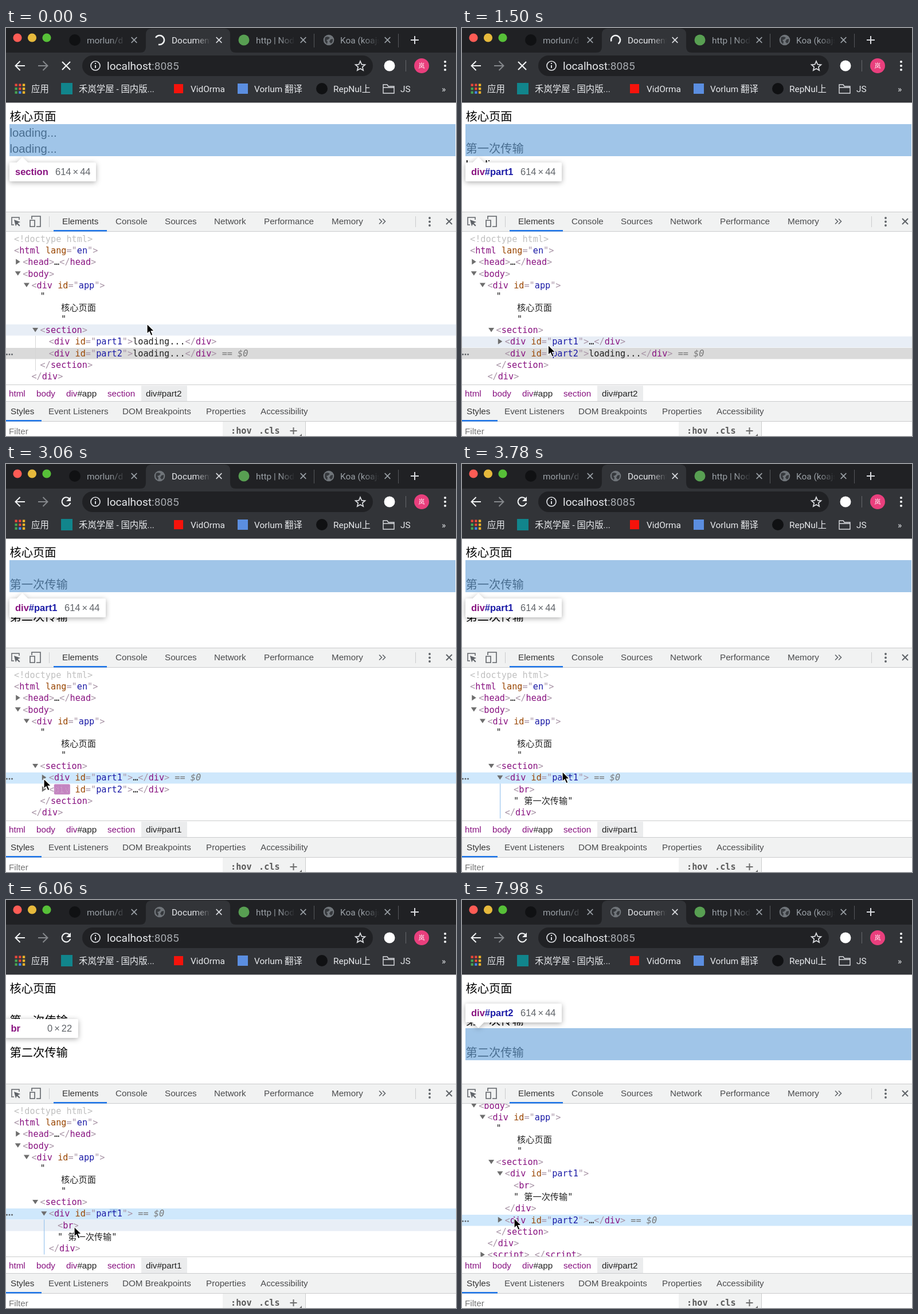
An HTML page that plays this animation: 785x713 px, repeating every 8000 ms.

```html
<!DOCTYPE html>
<html lang="zh-CN">
<head>
<meta charset="utf-8">
<style>
html, body { margin: 0; width: 100%; height: 100%; overflow: hidden; background: #fff; }
svg { display: block; }
text { white-space: pre; }
.ui { font: 15.4px Roboto, "Noto Sans CJK SC", "Noto Sans CJK", sans-serif; fill: #e8eaed; }
.tool { font: 15.2px "Liberation Sans", Roboto, sans-serif; fill: #4a4b4d; }
.page { font: 20.27px "Liberation Sans", "Noto Sans CJK SC", "Noto Sans CJK", sans-serif; }
.code { font: 15.2px "DejaVu Sans Mono", "Noto Sans CJK SC", "Noto Sans CJK", monospace; fill: #222; }
.tip { font: 16.5px "Liberation Sans", sans-serif; }
.tip.name { font-weight: bold; }
</style>
</head>
<body>
<svg width="785" height="713" viewBox="0 0 785 713">
  <defs>
    <clipPath id="treeClip"><rect y="356" width="785" height="267"/></clipPath>
    <clipPath id="pageClip"><rect y="130" width="785" height="191"/></clipPath>
    <linearGradient id="fadeDark"><stop stop-color="#202124" stop-opacity="0"/><stop offset="1" stop-color="#202124"/></linearGradient>
    <linearGradient id="fadeTab"><stop stop-color="#323438" stop-opacity="0"/><stop offset="1" stop-color="#323438"/></linearGradient>
    <filter id="shadow" x="-20%" y="-50%" width="140%" height="220%"><feDropShadow dx="0" dy="2" stdDeviation="5" flood-opacity=".32"/></filter>
    <g id="globe">
      <circle r="9.3" fill="#70757a"/>
      <path d="M-6-5Q-1-7 2-4L-1-1-4 0-2 3-3 7Q-9 2-6-5ZM3-1L7-2Q8 3 4 6L1 3Z" fill="#35383c"/>
    </g>
  </defs>
  <g id="browser"></g>
  <g id="page" clip-path="url(#pageClip)"></g>
  <g id="tools"></g>
  <g id="tree" clip-path="url(#treeClip)"></g>
  <g id="live"></g>
</svg>
<script>
const LOOP = 8000;
const PART1_AT = 540, SELECT1_AT = 2000, PART2_AT = 2900, EXPAND_AT = 3200, SELECT2_AT = 7380;
const PURPLE = '#881280', BLUE = '#1a1aa6', BRACKET = '#a894a6', BROWN = '#994500';
const STRIP = '#202124', TOOLBAR = '#323438';

const layer = id => document.getElementById(id);
const rect = (x, y, w, h, fill, extra = '') => `<rect x="${x}" y="${y}" width="${w}" height="${h}" fill="${fill}" ${extra}/>`;
const circle = (x, y, r, fill) => `<circle cx="${x}" cy="${y}" r="${r}" fill="${fill}"/>`;
const line = (d, stroke, w = 2) => `<path d="${d}" fill="none" stroke="${stroke}" stroke-width="${w}"/>`;
const label = (cls, x, y, s, extra = '') => `<text class="${cls}" x="${x}" y="${y}" ${extra}>${s}</text>`;
const span = (fill, s) => `<tspan fill="${fill}">${s}</tspan>`;
const cross = (x, y, r, color, w = 2) => line(`M${x - r} ${y - r}l${2 * r} ${2 * r}m0 ${-2 * r}l${-2 * r} ${2 * r}`, color, w);
const plus = (x, y, r, color, w = 2) => line(`M${x - r} ${y}h${2 * r}M${x} ${y - r}v${2 * r}`, color, w);
const clamp = v => Math.min(1, Math.max(0, v));
const smooth = v => { v = clamp(v); return v * v * (3 - 2 * v); };

function drawBrowser() {
  const tabs = [[141, 'morlun/d', '#9aa0a6'], [289, 'Document', '#e8eaed'], [436, 'http | Node', '#9aa0a6'], [583, 'Koa (koajs', '#9aa0a6']];
  let s = rect(0, 0, 785, 131, STRIP) + rect(0, 43, 785, 88, TOOLBAR);
  s += `<path d="M234 43Q244 43 244 33V11Q244 1 254 1H381Q391 1 391 11V33Q391 43 401 43Z" fill="${TOOLBAR}"/>`;
  s += ['#fe5c55', '#e6b93c', '#57c038'].map((c, i) => circle(20 + 25.5 * i, 17, 7.6, c)).join('');
  tabs.forEach(([x, title, color], i) => {
    const active = i === 1;
    s += label('ui', x, 27, title, `style="fill:${color}"`);
    s += rect(x + 40, 10, 28, 24, `url(#${active ? 'fadeTab' : 'fadeDark'})`) + rect(x + 68, 10, 22, 24, active ? TOOLBAR : STRIP);
    s += cross(x + 82.5, 21, 4.8, active ? '#dadce0' : '#9aa0a6', 1.7);
  });
  s += circle(120, 21, 10, '#101113') + circle(415, 21, 9.5, '#589f52') + '<use href="#globe" x="563" y="21"/>';
  s += rect(537, 10, 1, 24, '#55575b') + rect(684, 10, 1, 24, '#55575b') + plus(713, 21, 7, '#dadce0');

  s += line('M33 66H17M24.5 58l-8 8 8 8', '#f1f3f4') + line('M56 66H72M64.5 58l8 8-8 8', '#85888c');
  s += rect(133, 48, 507, 36, STRIP, 'rx="18"');
  s += '<circle cx="156" cy="66" r="8" fill="none" stroke="#dadce0" stroke-width="1.7"/>' + line('M156 65v5M156 61v2', '#dadce0');
  s += label('ui', 176, 72.5, 'localhost' + span('#a5a9ae', ':8085'), 'style="font-size:19.1px"');
  s += line('M618 58l2.4 5.6 6 .5-4.6 4 1.4 5.9-5.2-3.1-5.2 3.1 1.4-5.9-4.6-4 6-.5z', '#dadce0', 1.7);
  s += circle(669, 66, 9.5, '#fff') + rect(697, 56, 1, 20, '#65676b');
  s += circle(725, 66, 13, '#e93f7d') + label('ui', 725, 70, '岚', 'text-anchor="middle" style="font-size:11px;fill:#fff"');
  s += [59, 66, 73].map(y => circle(766, y, 2.1, '#f1f3f4')).join('');

  const dots = ['#e8483b', '#e8483b', '#f0b429', '#45a553', '#e8483b', '#f0b429', '#45a553', '#4585ee', '#f0b429'];
  s += dots.map((c, i) => rect(15.5 + i % 3 * 6.7, 97.5 + Math.floor(i / 3) * 6.5, 4.3, 4.3, c)).join('');
  s += rect(96, 96, 20, 20, '#11858c') + rect(293, 98, 16, 16, '#f5130b') + rect(404, 97, 18, 18, '#5b8ee0') + circle(551, 106, 10, '#101113');
  s += '<path d="M658 99h7l2 3h10v12h-19zM658 104h19" fill="none" stroke="#dadce0" stroke-width="1.4"/>';
  const marks = [[44, '应用'], [127, '禾岚学屋 - 国内版...'], [322, 'VidOrma'], [433, 'Vorlum 翻译'], [571, 'RepNul上'], [688, 'JS'], [760, '»']];
  return s + marks.map(([x, name]) => label('ui', x, 111.7, name)).join('');
}

function drawTools() {
  let s = rect(0, 321, 785, 392, '#fff') + rect(0, 321, 785, 35, '#f1f2f2') + rect(0, 321, 785, 1, '#c8c9cb') + rect(0, 355, 785, 1, '#cbcccd');
  s += line('M14 344H10V331H23V335', '#5f6368', 1.5) + '<path d="M14 335l11 4-4.5 2 4 4-1.5 1.5-4-4-2 4z" fill="#5f6368"/>';
  s += line('M45 334V329H60V347H53M42 336h8v11h-8z', '#5f6368', 1.6) + rect(75, 329, 1, 19, '#cbcccd');
  s += rect(83, 353, 93, 2.5, '#1a73e8');
  s += [[98, 'Elements'], [191, 'Console'], [277, 'Sources'], [363, 'Network'], [450, 'Performance'], [568, 'Memory']]
    .map(([x, name]) => label('tool', x, 343.3, name, x === 98 ? 'style="fill:#333"' : '')).join('');
  s += line('M651 333.5l4.5 4.5-4.5 4.5M657 333.5l4.5 4.5-4.5 4.5', '#5f6368', 1.6) + rect(714, 329, 1, 19, '#cbcccd');
  s += [332, 338.5, 345].map(y => circle(739, y, 1.9, '#5f6368')).join('') + cross(773, 338, 5, '#5f6368', 2);

  s += rect(0, 623, 785, 1, '#cbcccd') + rect(236, 625, 80, 27, '#ebeced');
  s += label('tool', 5, 643.5, 'html', `style="fill:${PURPLE}"`) + label('tool', 53, 643.5, 'body', `style="fill:${PURPLE}"`);
  s += label('tool', 105, 643.5, span(PURPLE, 'div') + span('#222', '#app')) + label('tool', 177, 643.5, 'section', `style="fill:${PURPLE}"`);

  s += rect(0, 652, 785, 36, '#f1f2f2') + rect(0, 652, 785, 1, '#cbcccd') + rect(0, 687, 785, 1, '#cbcccd') + rect(0, 685, 62, 2.5, '#1a73e8');
  s += [[8, 'Styles'], [74, 'Event Listeners'], [203, 'DOM Breakpoints'], [349, 'Properties'], [444, 'Accessibility']]
    .map(([x, name]) => label('tool', x, 675.3, name, x === 8 ? 'style="fill:#333"' : '')).join('');
  s += rect(378, 688, 144, 25, '#f1f2f2') + rect(522, 688, 1, 25, '#cbcccd') + label('tool', 5, 709.5, 'Filter', 'style="fill:#757575"');
  s += label('code', 392, 709, ':hov', 'style="font-weight:bold;fill:#5a5a5a"') + label('code', 441, 709, '.cls', 'style="font-weight:bold;fill:#5a5a5a"');
  return s + plus(501.5, 704, 6, '#6e6e6e') + '<path d="M516 709v4h-4z" fill="#6e6e6e"/>';
}

// Pointer stops: time, x, y
const STOPS = [
  [-100, 246, 526], [0, 246, 517], [300, 225, 400], [420, 222, 343], [690, 224, 343], [780, 236, 525],
  [1100, 190, 551], [1900, 111, 557], [2400, 111, 557], [2900, 66, 550], [3220, 66, 550], [3760, 175, 537.5], [4260, 175, 537.5],
  [4900, 150, -40], [4901, 160, 740], [5540, 160, 740], [6020, 119, 571], [6480, 119, 571], [7200, 92, 557], [8000, 91, 556]
];
function pointer(t) {
  const i = Math.max(1, STOPS.findIndex(stop => stop[0] >= t));
  const [t0, x0, y0] = STOPS[i - 1], [t1, x1, y1] = STOPS[i];
  const k = smooth((t - t0) / (t1 - t0));
  return { x: x0 + (x1 - x0) * k, y: y0 + (y1 - y0) * k };
}

const open = (name, key, value) => span(BRACKET, '&lt;') + span(PURPLE, name)
  + (key ? ' ' + span(BROWN, key) + span(BRACKET, '="') + span(BLUE, value) + span(BRACKET, '"') : '') + span(BRACKET, '&gt;');
const close = name => span(BRACKET, '&lt;/') + span(PURPLE, name) + span(BRACKET, '&gt;');

function treeRows(t, scroll) {
  const rows = [];
  let y = 368.5 - scroll;
  const add = (depth, html, more = {}, step = 20.27) => {
    rows.push({ y, x: 14 + 15.2 * depth, html, ...more });
    y += step;
  };
  const part = (id, loadedAt) => {
    const start = open('div', 'id', id), end = close('div');
    const flash = t >= loadedAt ? (1 - clamp((t - loadedAt) / 1400)) ** 4 : 0;
    if (t < loadedAt) return add(4, start + 'loading...' + end, { id });
    if (id === 'part2' || t < EXPAND_AT) return add(4, start + '…' + end, { id, arrow: 'right', flash });
    add(4, start, { id, arrow: 'down' });
    add(5, open('br'), { id: 'br' });
    add(5, '" 第一次传输"');
    add(4, end);
  };
  add(0, span('#c0c0c0', '&lt;!doctype html&gt;'));
  add(0, open('html', 'lang', 'en'));
  add(1, open('head') + '…' + close('head'), { arrow: 'right' });
  add(1, open('body'), { arrow: 'down' });
  add(2, open('div', 'id', 'app'), { arrow: 'down' }, 19.6);
  add(3, '"', {}, 19.6);
  add(5.4, '核心页面', {}, 19.6);
  add(5.4, '"', {}, 19.6);
  add(3, open('section'), { id: 'section', arrow: 'down' });
  part('part1', PART1_AT);
  part('part2', PART2_AT);
  add(3, close('section'));
  add(2, close('div'));
  add(2, open('script') + ' ' + close('script'), { arrow: 'right' });
  return rows;
}

function drawTree(rows, hovered, selected, t) {
  let s = '';
  for (const row of rows) {
    const { x, y, id, arrow, flash } = row, chosen = id === selected;
    const band = fill => rect(0, Math.floor(y) - 9, 785, 19.5, fill);
    if (chosen) {
      s += band(t < SELECT1_AT ? '#dadada' : '#cfe8fc');
      s += [1.5, 6, 10.5].map(dx => circle(dx, y + 2, 1.4, '#5f6368')).join('');
      if (id === 'part1' && t >= 3740) s += rect(181, y - 8.5, 13.5, 8, '#abcfef');
    } else if (row === hovered) s += band('#e8eef6');
    if (arrow) s += `<path d="${arrow === 'down' ? 'M-5-3.5H5L0 4Z' : 'M-3.5-5V5L4 0Z'}" fill="#6e6e6e" transform="translate(${x - 8.5} ${y - .5})"/>`;
    if (flash) s += rect(x + 9, y - 9, 28, 18, '#9e3699', `rx="2" opacity="${flash}"`);
    s += label('code', x, y + 5.2, row.html + (chosen ? `<tspan fill="#777" font-style="italic"> == $0</tspan>` : ''));
    if (flash) s += label('code', x + 9.15, y + 5.2, 'div', `style="fill:#fff" opacity="${flash}"`);
  }
  const section = rows.find(r => r.id === 'section');
  const sectionEnd = rows[rows.length - 3];
  if (hovered === section) s += rect(51, section.y + 10, 1, sectionEnd.y - section.y, '#d5d5d5');
  if (selected === 'part1' && t >= EXPAND_AT) s += rect(66, section.y + 30.5, 1.2, 61, '#9cc5ee');
  return s;
}

function drawTip(id, lines1, lines2) {
  const spots = { section: [168, lines1 + lines2], part1: [168, lines1], part2: [168 + 28 * lines1, lines2], br: [169, 1] };
  if (!spots[id]) return '';
  const [top, lines] = spots[id], bottom = top + 28 * lines, isBr = id === 'br';
  const [left, right, nameX, sizeX] = isBr ? [-4, 126, 8.5, 72] : id === 'section' ? [6, 157, 16, 86] : [6, 174, 16, 102];
  const above = bottom > 270 && top > 213;
  const y = above ? top - 43 : Math.min(bottom + 11, 288);
  const notch = isBr ? '' : above ? `M18 ${y + 32}h21l-10.5 10.5z` : `M18 ${y + 1}h21l-10.5 -10z`;
  const name = id.startsWith('part') ? span(PURPLE, 'div') + span(BLUE, '#' + id) : span(PURPLE, id);
  return (isBr ? '' : rect(6, top, 778, bottom - top, '#6fa8dc', 'opacity=".66"'))
    + `<g filter="url(#shadow)">${rect(left, y, right - left, 33, '#fff', 'rx="3"')}<path d="${notch}" fill="#fff"/></g>`
    + label('tip name', nameX, y + 22.3, name)
    + label('tip', sizeX, y + 22.3, `${isBr ? 0 : 614}<tspan dx="3">×</tspan><tspan dx="3">${22 * lines}</tspan>`, 'fill="#5f6368"');
}

function drawPage(t, hoverId) {
  const lines1 = t >= PART1_AT ? 2 : 1, lines2 = t >= PART2_AT ? 2 : 1;
  const words = ['核心页面', ...(lines1 > 1 ? ['', '第一次传输'] : ['loading...']), ...(lines2 > 1 ? ['', '第二次传输'] : ['loading...'])];
  return rect(0, 130.5, 785, 191, '#fff') + words.map((w, i) => label('page', 6.5, 162 + 28 * i, w)).join('') + drawTip(hoverId, lines1, lines2);
}

function drawSpinner(t) {
  const HALF = 666, MAX = 265;
  const phase = (t + HALF - 80) / HALF, k = smooth(phase % 1);
  const shrinking = Math.floor(phase) % 2 === 1, shrinks = Math.floor(phase / 2);
  const start = 210 + .26 * t + 270 * (shrinks + (shrinking ? k : 0));
  const sweep = Math.max(5, MAX * (shrinking ? 1 - k : k));
  const at = deg => `${268 + 8 * Math.cos(deg * Math.PI / 180)} ${21 + 8 * Math.sin(deg * Math.PI / 180)}`;
  return line(`M${at(start)}A8 8 0 ${sweep > 180 ? 1 : 0} 1 ${at(start + sweep)}`, '#f1f3f4', 2.6);
}

function drawLive(t, cursor, hover, selected) {
  let s = t < PART2_AT
    ? drawSpinner(t) + cross(105, 66, 7, '#f1f3f4', 2.2)
    : '<use href="#globe" x="268" y="21"/>' + line('M110.5 60.5A7.5 7.5 0 1 0 112.3 68', '#f1f3f4', 2.2) + '<path d="M113 57v8h-8z" fill="#f1f3f4"/>';
  if (hover.y > 322 && hover.y < 355 && hover.x > 176 && hover.x < 262) s += rect(176, 322, 86, 33, '#000', 'opacity=".06"');
  s += label('tool', 244, 643.5, 'div#' + selected, 'style="fill:#222"');
  return s + `<path d="M0 0V17.5L4 13.8 6.9 20.5 10 19.2 7.1 12.6H12.5Z" transform="translate(${cursor.x} ${cursor.y})" fill="#000" stroke="#fff" stroke-width="1.2"/>`;
}

function render(t) {
  const cursor = pointer(t), hover = pointer(t - 100); // hover feedback trails the pointer
  const rows = treeRows(t, 70 * smooth((t - 6540) / 500));
  const inTree = hover.y > 356 && hover.y < 623;
  const hovered = inTree ? rows.find(r => Math.abs(r.y - hover.y) < 10.1) : null;
  const selected = t >= SELECT1_AT && t < SELECT2_AT ? 'part1' : 'part2';
  layer('page').innerHTML = drawPage(t, hovered?.id);
  layer('tree').innerHTML = drawTree(rows, hovered, selected, t);
  layer('live').innerHTML = drawLive(t, cursor, hover, selected);
}

layer('browser').innerHTML = drawBrowser();
layer('tools').innerHTML = drawTools();
const begin = performance.now();
function tick() {
  render((performance.now() - begin) % LOOP);
  requestAnimationFrame(tick);
}
tick();
</script>
</body>
</html>
```
